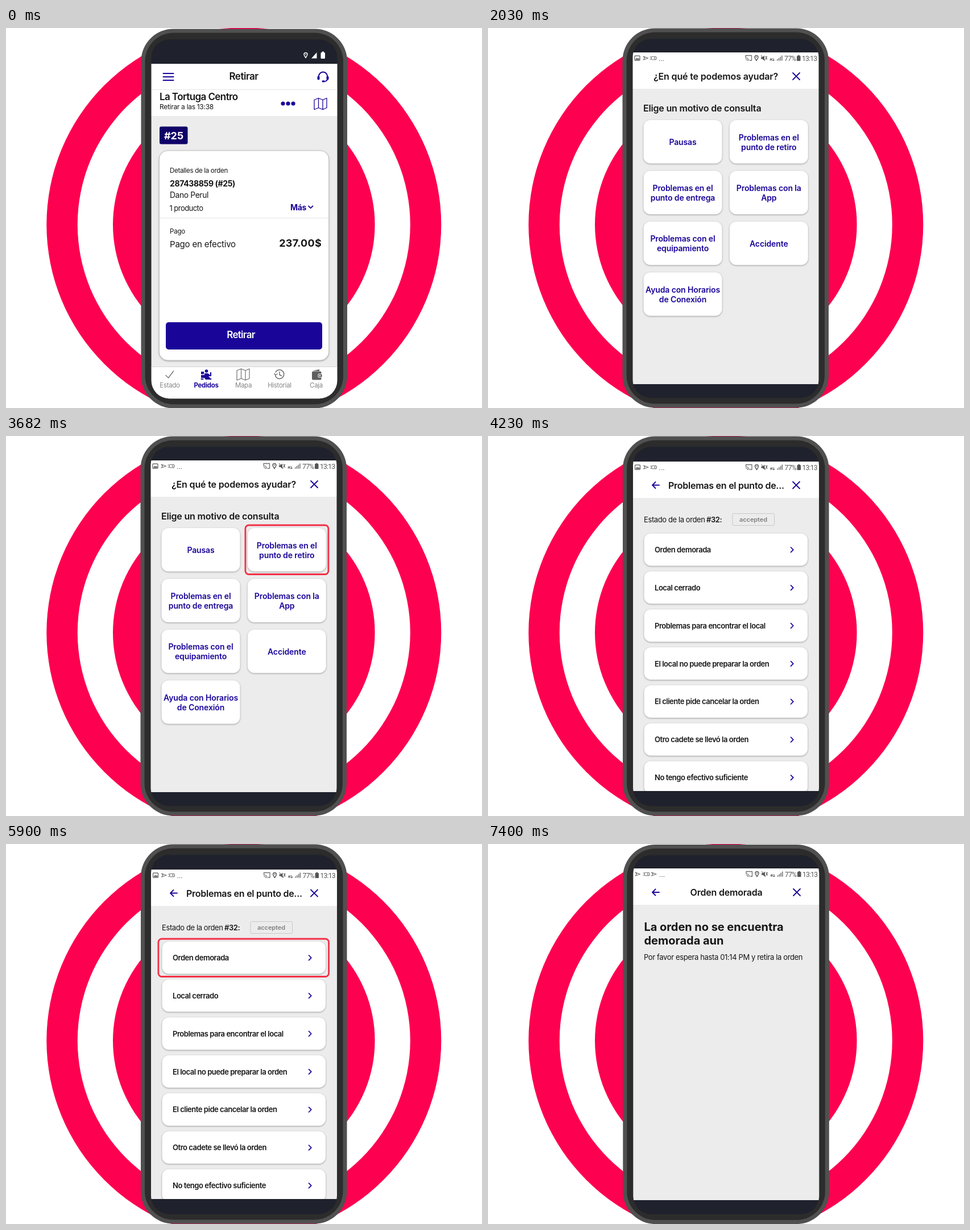
Animation, 837 px wide and 669 px high, one loop 8 s. Source, as an HTML page:

```html
<!DOCTYPE html>
<html lang="es">
<head>
<meta charset="utf-8">
<title>Ayuda con la orden</title>
<style>
html, body { margin: 0; width: 100%; height: 100%; overflow: hidden; background: #fff; }
svg { display: block; width: 837px; height: 669px; }
text { font-family: Inter, sans-serif; white-space: pre; }
.card { fill: #fff; filter: drop-shadow(0 1.5px 1.5px #0005); }
.line { fill: none; stroke-linecap: round; stroke-linejoin: round; }
</style>
</head>
<body>
<svg id="stage" viewBox="0 0 837 669"></svg>
<script>
const NAVY = '#1a0599', INK = '#161616', GREY = '#6f6f6f', PALE = '#ececec';
const LOOP = 8000;

const rect = (x, y, w, h, fill, r = 0, extra = '') =>
  `<rect x="${x}" y="${y}" width="${w}" height="${h}" rx="${r}" fill="${fill}" ${extra}/>`;
const card = (x, y, w, h, r) =>
  `<rect class="card" x="${x}" y="${y}" width="${w}" height="${h}" rx="${r}"/>`;
const circle = (x, y, r, fill) => `<circle cx="${x}" cy="${y}" r="${r}" fill="${fill}"/>`;
const line = (d, color = NAVY, width = 1.8) =>
  `<path class="line" d="${d}" stroke="${color}" stroke-width="${width}"/>`;
const shape = (d, fill) => `<path d="${d}" fill="${fill}"/>`;
const move = (x, y, body) => `<g transform="translate(${x} ${y})">${body}</g>`;
const text = (s, x, y, size, gap = 0, weight = 400, fill = INK, anchor = 'start') =>
  `<text x="${x}" y="${y}" font-size="${size}" letter-spacing="${gap}" font-weight="${weight}" ` +
  `fill="${fill}" text-anchor="${anchor}">${s}</text>`;
const label = (s, x, y, size, gap, weight, fill) => text(s, x, y, size, gap, weight, fill, 'middle');

// Icons shared by several screens
const cross = (x, y) => line(`M${x - 6} ${y - 6}l12 12m0 -12l-12 12`);
const back = (x, y) => line(`M${x + 6} ${y}h-12m5.5 -5.5l-5.5 5.5l5.5 5.5`);
const map = (x, y, color, width) => move(x, y,
  line('M-11 -7l7.5 -3l7.5 3l7 -3v17l-7 3l-7.5 -3l-7.5 3zM-3.5 -10v17M4 -7v17', color, width));
const pin = (x, y, color) => move(x, y,
  line('M0 4.5C-1 2 -3 0.5 -3 -1.5A3 3 0 0 1 3 -1.5C3 0.5 1 2 0 4.5z', color, 1.4) + circle(0, -1.5, 0.9, color));

const kite = x => line(`M${x - 4} -3l8.5 3l-8.5 3l2.5 -3z`, GREY, 1.1);
const bulb = x => line(`M${x - 5} -2h2m-2 4h2m3 -5a3 3 0 1 0 .1 0M${x + 3} -3a3 3 0 0 1 0 6`, GREY, 1.1);
const picture = x => rect(x - 4.5, -4, 9, 8, 'none', 1, `stroke="${GREY}" stroke-width="1.4"`) +
  shape(`M${x - 3.5} 3l2.5 -4l2 2l1.5 -1.5l1.5 3.5z`, GREY);

function statusBar(x, y, left) {
  const smallText = (s, tx, size, gap) =>
    `<text x="${tx}" y="4.5" style="font-family:Roboto,sans-serif" font-size="${size}" letter-spacing="${gap}" fill="#555">${s}</text>`;
  const bars = [0, 1, 2, 3].map(i => rect(508 + i * 2.7, 2 - i * 2.2, 1.5, 2.5 + i * 2.2, GREY)).join('');
  return move(x, y, left + smallText('...', 300, 13, 0) +
    line('M453 -1v-3.5h10.5v8.5h-3', GREY, 1.3) + line('M453 1.5a3 3 0 0 1 3 3M453 -1a5.5 5.5 0 0 1 5.5 5.5', GREY, 1.2) +
    pin(472, 0, '#555') +
    shape('M480 -1.5h2.5l3.5 -3v9l-3.5 -3h-2.5z', '#555') + line('M480.5 -4.5l6.5 8.5M488 -3l2.5 5m0 -5l-2.5 5', '#555', 1.1) +
    smallText('4G', 495, 6.5, 0) + shape('M496 1l1.7 3.5l1.7 -3.5zM500.500 4.5l1.7 -3.5l1.700 3.5z', GREY) +
    bars + smallText('77%', 521, 12, -0.6) +
    rect(543, -4, 6.5, 9, '#555', 1) + rect(544.8, -5.2, 3, 2, '#555') +
    smallText('13:13', 552, 12, -0.7));
}

function frame(x, y, body) {
  return move(x, y,
    rect(236.5, 0.5, 362.5, 668, '#505050', 57) +
    rect(243.5, 7.5, 348.5, 654, '#2c2c2c', 50) +
    `<g clip-path="url(#screen)">${rect(240, 10, 360, 650, '#1f222c')}${move(-x, -y, body)}</g>`);
}

const pane = (top, split, bottom) =>
  rect(240, top, 360, split - top, '#fff') + rect(240, split, 360, bottom - split, PALE);

function orderScreen() {
  const header = pane(63, 155, 596) + rect(240, 108, 360, 1, '#e6e6e6') +
    pin(527, 48, '#fff') + shape('M537 53.500h9.5v-10.500z', '#fff') +
    rect(553.5, 43, 7.5, 11, '#fff', 1.5) + rect(555.5, 41.5, 3.5, 3, '#fff') +
    line('M276.500 80h18m-18 6h18m-18 6h18', NAVY, 2) +
    label('Retirar', 418, 90.500, 17, -0.5, 600) +
    line('M550 88v-3a7.500 7.500 0 0 1 15 0v3M565 90q-.5 4 -5.5 4', NAVY, 2) +
    rect(547.5, 84.5, 4, 7, NAVY, 2) + rect(563.5, 84.5, 4, 7, NAVY, 2) + rect(555.5, 92.300, 5, 3.2, NAVY, 1.6) +
    text('La Tortuga Centro', 270, 127, 17, -0.6, 600) +
    text('Retirar a las 13:38', 270, 143, 12, -0.3) +
    [487, 496, 505].map(x => circle(x, 133, 3.6, NAVY)).join('') + map(553, 133.5, NAVY, 1.3);

  const body = rect(270, 173.5, 49.5, 31, '#0f0368', 3) + label('#25', 295, 196, 18, 0, 700, '#fff') +
    `<rect class="card" x="269.500" y="216" width="298" height="369" rx="15" stroke="#c9c9c9"/>` +
    text('Detalles de la orden', 288, 255, 11.5, -0.3) +
    text('287438859 (#25)', 288, 278.500, 14, -0.35, 700) +
    text('Dano Perul', 288, 299, 13.8, -0.35) +
    text('1 producto', 287.5, 322, 13, -0.55) +
    text('Más', 500, 321, 14, -0.3, 700, NAVY) + line('M532 313.500l3.700 3.700l3.700 -3.700') +
    rect(270, 334, 297, 1, '#e6e6e6') +
    text('Pago', 288, 362, 11.5, -0.2) +
    text('Pago en efectivo', 288, 386, 15, -0.2) +
    text('237.00$', 555, 385, 18, 0.3, 700, INK, 'end') +
    rect(281, 518, 275, 48, NAVY, 5) + label('Retirar', 413, 546, 17, -0.7, 600, '#fff');

  const tabs = rect(240, 596, 360, 60, '#fff') + rect(240, 596, 360, 1, '#d5d5d5') +
    line('M281 611.500l4.500 4.500l9 -12', GREY, 1.3) +
    circle(352.5, 604, 2.8, NAVY) + rect(343, 605, 5, 4.5, NAVY) + rect(343, 611, 6, 5, NAVY) +
    shape('M349 608h6l4 3v-5h2v7h-5l3 3v3h-8l-2 -3z', NAVY) + line('M343.500 618h3m11 0h3', NAVY, 2) +
    map(417, 610, GREY, 1.2) +
    line('M474 606a7.800 7.800 0 1 1 -.5 6M472 608.500l2 2.500l3 -2M481 605.500v5l3.500 2', GREY, 1.5) +
    rect(538, 604.5, 16.5, 15, '#5f5f5f', 2) + shape('M539 603.500l12 -2.500v3z', '#5f5f5f') +
    rect(549, 609, 7, 6, '#5f5f5f', 1, 'stroke="#fff"') + circle(552, 612, 1.2, '#fff') +
    [['Estado', 288], ['Pedidos', 352], ['Mapa', 417.5], ['Historial', 481], ['Caja', 545.5]].map(([s, x], i) =>
      label(s, x, 633, 11.4, -0.25, i == 1 ? 700 : 400, i == 1 ? NAVY : '#858585')).join('');

  return frame(1, 1, header + body + tabs);
}

function reasonScreen() {
  const reasons = ['Pausas', 'Problemas en el|punto de retiro', 'Problemas en el|punto de entrega',
    'Problemas con la|App', 'Problemas con el|equipamiento', 'Accidente', 'Ayuda con Horarios|de Conexión'];
  const cards = reasons.map((reason, i) => {
    const x = 273.5 + i % 2 * 151.3, y = 162 + Math.floor(i / 2) * 89.4, rows = reason.split('|');
    return card(x, y, 138, 76.5, 12) + rows.map((s, k) =>
      label(s, x + 69, y + 44 + (k - (rows.length - 1) / 2) * 17, 14, -0.12, 600, NAVY)).join('');
  }).join('');
  return frame(0, 0, pane(43, 107, 627) +
    statusBar(0, 53, picture(262.5) + kite(277) + bulb(290)) +
    label('¿En qué te podemos ayudar?', 400.5, 91, 16, -0.15, 600) + cross(542, 85) +
    text('Elige un motivo de consulta', 273, 147, 16, -0.18, 600) + cards);
}

function problemScreen() {
  const problems = ['Orden demorada', 'Local cerrado', 'Problemas para encontrar el local',
    'El local no puede preparar la orden', 'El cliente pide cancelar la orden',
    'Otro cadete se llevó la orden', 'No tengo efectivo suficiente'];
  const rows = problems.map((s, i) => move(0, 171.5 + i * 66.85,
    card(274.5, 0, 287.5, 57, 12) + text(s, 293, 33.5, 13, -0.47, 600) +
    line('M532.500 24.500l4.300 4.300l-4.300 4.300', NAVY, 1.7))).join('');
  return frame(0.5, 0, pane(45, 109, 625) + statusBar(0.5, 55, picture(262.5) + kite(277) + bulb(290)) +
    back(295, 86.5) + text('Problemas en el punto de...', 317, 92.5, 16, -0.25, 600) + cross(542, 86.5) +
    text('Estado de la orden', 274, 151.5, 13, -0.4) + text('#32:', 384, 151.5, 13, -0.4, 600) +
    rect(430, 136.5, 73.5, 21, PALE, 2, 'stroke="#c8c8c8"') + label('accepted', 466.5, 151, 11, -0.1, 600, '#808080') +
    rows + rect(240, 625, 360, 40, '#1f222c'));
}

function resultScreen() {
  return frame(0.8, 0.5, pane(43, 107, 627) + statusBar(1, 53, kite(262) + bulb(277) + kite(290.5)) +
    back(295, 85) + label('Orden demorada', 419, 91, 16, -0.2, 600) + cross(543, 85) +
    text('La orden no se encuentra', 274.5, 152.5, 20, -0.05, 700) +
    text('demorada aun', 274.5, 176.5, 20, 0, 700) +
    text('Por favor espera hasta 01:14 PM y retira la orden', 274, 204, 13, -0.37));
}

const focus = (x, y, w, h) => rect(x, y, w, h, 'none', 6, 'stroke="#f42f45" stroke-width="2.8"');

// Each layer is visible from its start to its end time
const layers = [
  [0, 2030, orderScreen()],
  [2030, 4230, reasonScreen()],
  [4230, 6500, problemScreen()],
  [6500, LOOP, resultScreen()],
  [700, 2030, focus(542.4, 69.4, 31.2, 32.2)],
  [2860, 4230, focus(420.9, 157, 146, 86.5)],
  [5000, 6500, focus(267.9, 167, 299.700, 66.5)],
];

const stage = document.getElementById('stage');
stage.innerHTML = `<clipPath id="screen">${rect(254.5, 19, 327, 632.500, '#000', 32)}</clipPath>` +
  circle(418.3, 346.2, 347, '#fd0050') + circle(418.3, 346.2, 292.5, '#fff') + circle(418.3, 346.2, 230.3, '#fd0050') +
  layers.map(([, , body]) => `<g class="layer">${body}</g>`).join('');
const groups = stage.querySelectorAll('.layer');

function draw(now) {
  const t = now % LOOP;
  layers.forEach(([start, end], i) => {
    groups[i].style.display = t >= start && t < end ? '' : 'none';
  });
}

const begin = performance.now();
function tick() {
  draw(performance.now() - begin);
  requestAnimationFrame(tick);
}
tick();
</script>
</body>
</html>
```
